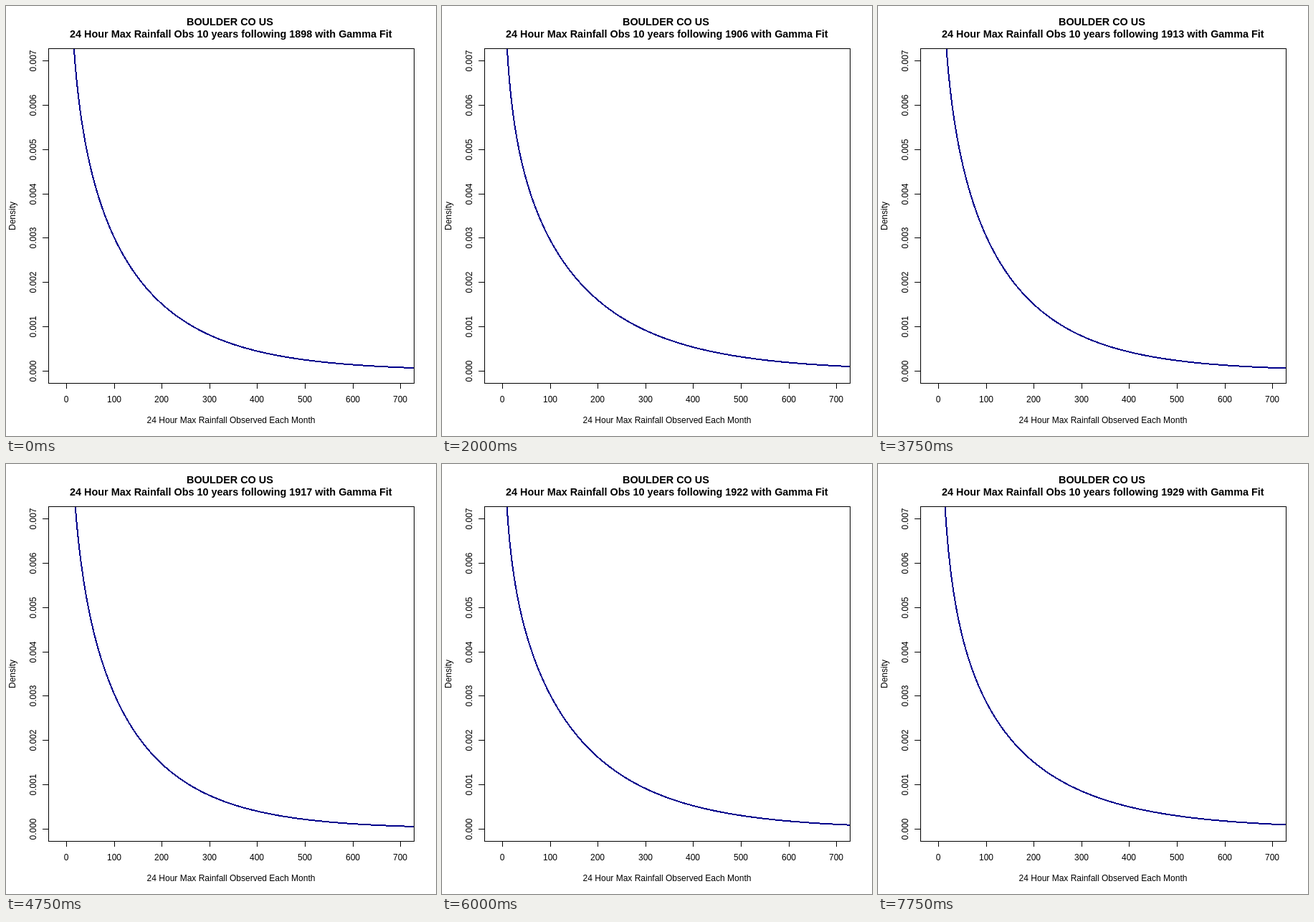
Write an HTML page that moves like this. It is 600x600 px and loops after 8 s.

```html
<!DOCTYPE html>
<html lang="en">
<head>
<meta charset="utf-8">
<title>Rainfall gamma fit</title>
<style>
  html, body { margin: 0; width: 100%; height: 100%; overflow: hidden; background: #fff; }
  svg { display: block; }
  text { font: 12px "Liberation Sans", Arial, sans-serif; text-anchor: middle; }
  .title { font-size: 14.4px; font-weight: bold; }
  path { fill: none; stroke: #000; shape-rendering: crispEdges; }
  #curve { stroke: #00008b; stroke-width: 2; stroke-linejoin: round; stroke-linecap: round; }
</style>
</head>
<body>
<svg width="600" height="600" viewBox="0 0 600 600">
  <clipPath id="plot"><rect x="59" y="59" width="511" height="468"/></clipPath>
  <path id="curve" clip-path="url(#plot)"/>
  <path id="axes"/>
  <g id="labels">
    <text class="title" x="312.4" y="27">BOULDER CO US</text>
    <text class="title" x="313.8" y="44" id="heading"></text>
    <text x="314" y="582">24 Hour Max Rainfall Observed Each Month</text>
    <text transform="translate(13 293) rotate(-90)">Density</text>
  </g>
</svg>
<script>
const STEP = 250, YEARS = 32, FIRST_YEAR = 1898;
// Gamma fits at key years: [year, shape, scale]
const FITS = [
  [1898, 0.767, 189.5], [1902, 0.96, 174.5], [1903, 0.9, 181],
  [1906, 0.8, 210], [1909, 0.9, 178.5], [1913, 0.77, 183],
  [1917, 0.76, 177], [1920, 0.955, 176], [1922, 0.825, 198.5],
  [1928, 0.735, 217], [1929, 0.733, 218]
];
const el = id => document.getElementById(id);
const px = x => 84 + x * 0.6661;
const py = density => 509.3 - density * 61840;

function logGamma(k) {
  let shift = 0;
  for (; k < 8; k++) shift += Math.log(k);
  return (k - 0.5) * Math.log(k) - k + Math.log(2 * Math.PI) / 2 + 1 / (12 * k) - shift;
}

function fitFor(year) {
  const i = Math.max(1, FITS.findIndex(fit => fit[0] >= year));
  const a = FITS[i - 1], b = FITS[i], t = (year - a[0]) / (b[0] - a[0]);
  return [1, 2].map(n => a[n] + (b[n] - a[n]) * t);
}

function curvePath(year) {
  const [shape, scale] = fitFor(year);
  const norm = logGamma(shape) + shape * Math.log(scale);
  const points = [];
  // Plotted against a one-based index, so each value sits one unit to the right
  for (let x = 1; x <= 733; x++) {
    const density = Math.exp((shape - 1) * Math.log(x) - x / scale - norm);
    points.push(px(x + 1).toFixed(2) + " " + py(density).toFixed(2));
  }
  return "M" + points.join("L");
}

function drawAxes() {
  let d = "M59.5 59.5H569.5V526.5H59.5Z", labels = "";
  for (let i = 0; i < 8; i++) {
    const x = Math.round(px(i * 100)), y = Math.floor(py(i / 1000) + 0.1);
    d += `M${x + 0.5} 526V534M51 ${y + 0.5}H59`;
    labels += `<text x="${x}" y="553">${i * 100}</text>` +
      `<text transform="translate(42 ${y + 0.5}) rotate(-90)">${(i / 1000).toFixed(3)}</text>`;
  }
  el("axes").setAttribute("d", d);
  el("labels").insertAdjacentHTML("beforeend", labels);
}

let shown;
function draw() {
  const year = FIRST_YEAR + Math.floor(performance.now() / STEP) % YEARS;
  if (year !== shown) {
    shown = year;
    el("heading").textContent = `24 Hour Max Rainfall Obs 10 years following ${year} with Gamma Fit`;
    el("curve").setAttribute("d", curvePath(year));
  }
  requestAnimationFrame(draw);
}

drawAxes();
draw();
</script>
</body>
</html>
```
